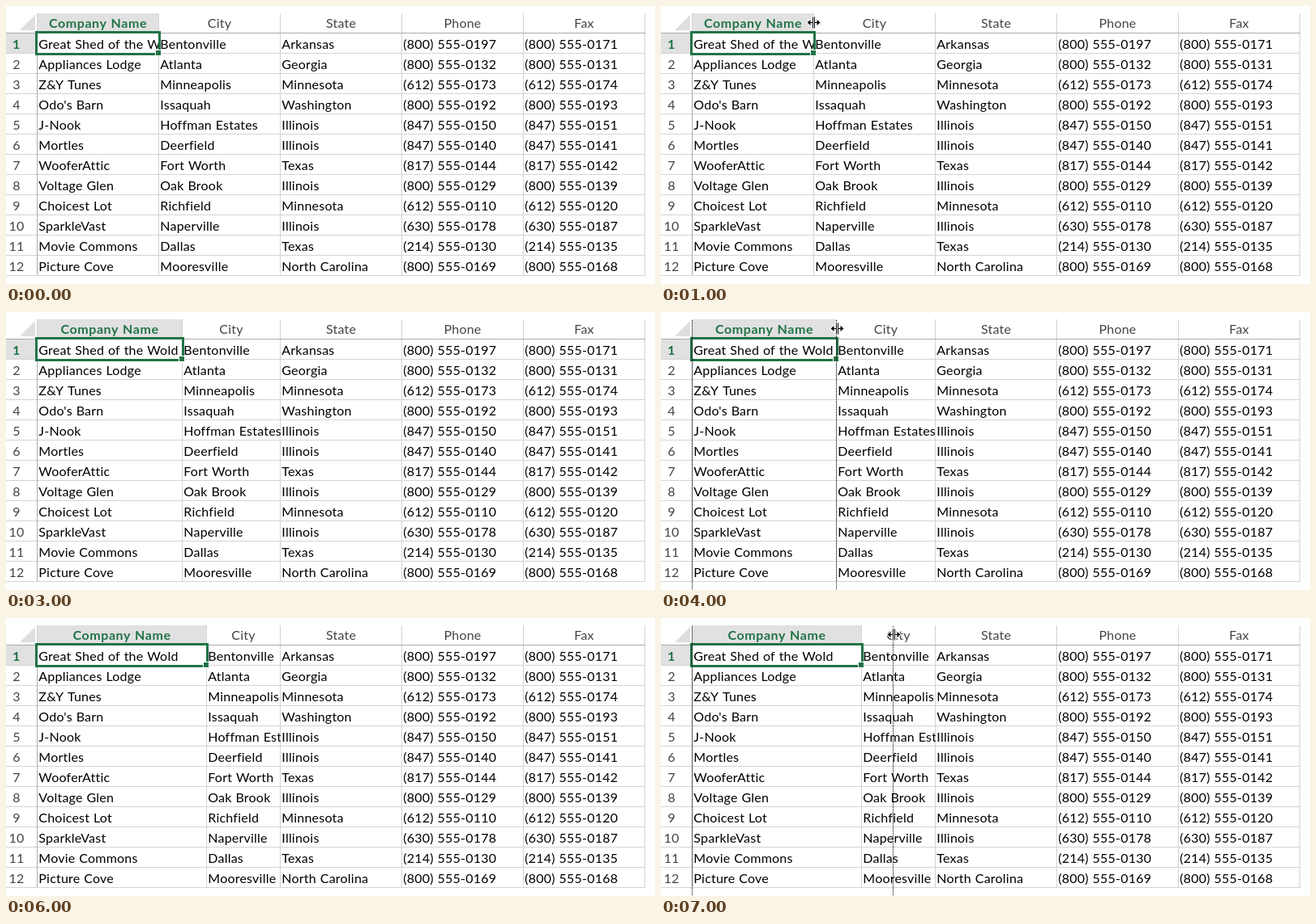
These frames come from a looping animation (801 by 344 pixels, 8000 ms). An HTML page with a canvas:

```html
<!DOCTYPE html>
<html lang="en">
<head>
<meta charset="utf-8">
<title>Resizing a spreadsheet column</title>
<style>
  html, body { margin: 0; width: 100%; height: 100%; overflow: hidden; background: #fff; }
  canvas { display: block; }
</style>
</head>
<body>
<canvas width="801" height="344"></canvas>
<script>
const ctx = document.querySelector('canvas').getContext('2d');
const GREEN = '#217346', GRID = '#d4d4d4', EDGE = '#ababab', SHADE = '#e1e1e1';
const LEFT = 38, TOP = 33, ROW = 25, RIGHT = 788, BOTTOM = 333;

const headers = ['Company Name', 'City', 'State', 'Phone', 'Fax'];
const rows = `Great Shed of the Wold|Bentonville|Arkansas|800|97|71
Appliances Lodge|Atlanta|Georgia|800|32|31
Z&Y Tunes|Minneapolis|Minnesota|612|73|74
Odo's Barn|Issaquah|Washington|800|92|93
J-Nook|Hoffman Estates|Illinois|847|50|51
Mortles|Deerfield|Illinois|847|40|41
WooferAttic|Fort Worth|Texas|817|44|42
Voltage Glen|Oak Brook|Illinois|800|29|39
Choicest Lot|Richfield|Minnesota|612|10|20
SparkleVast|Naperville|Illinois|630|78|87
Movie Commons|Dallas|Texas|214|30|35
Picture Cove|Mooresville|North Carolina|800|69|68`.split('\n').map(line => {
  const [name, city, state, area, phone, fax] = line.split('|');
  return [name, city, state, ...[phone, fax].map(n => `(${area}) 555-01${n}`)];
});

// One step per second: column border, pointer position, drag guide
const steps = [
  { border: 188 },
  { border: 188, pointer: 189 },
  { border: 188, pointer: 219, guide: 217 },
  { border: 217 },
  { border: 216, pointer: 218, guide: 216 },
  { border: 216, pointer: 249, guide: 247 },
  { border: 247 },
  { border: 247, pointer: 288, guide: 286 }
];

function fill(color, x, y, w, h) {
  ctx.fillStyle = color;
  ctx.fillRect(x, y, w, h);
}

function text(str, x, y, color, align = 'left', bold = false) {
  ctx.font = `${bold ? 700 : 400} 16px Lato, sans-serif`;
  ctx.letterSpacing = bold ? '0.6px' : '0.22px';
  ctx.wordSpacing = '0.5px';
  ctx.textAlign = align;
  ctx.fillStyle = color;
  ctx.fillText(str, x, y);
}

function label(str, x, y, active) {
  text(str, x, y, active ? GREEN : '#444', 'center', active);
}

function drawSheet(border) {
  const lines = [LEFT, border, 338, 488, 638, RIGHT];
  fill(SHADE, LEFT, 9, border - LEFT, TOP - 9);
  fill(SHADE, 0, TOP, LEFT, ROW);
  ctx.fillStyle = '#dedede';
  ctx.fill(new Path2D('M36 11V30H17Z'));

  for (let y = TOP; y <= BOTTOM; y += ROW) fill(GRID, 0, y, RIGHT + 1, 1);
  for (const x of lines) fill(GRID, x, 9, 1, BOTTOM - 8);
  fill(EDGE, 0, TOP, RIGHT + 1, 1);
  fill(EDGE, LEFT, TOP, 1, BOTTOM - TOP);

  headers.forEach((title, c) => {
    const [start, end] = [lines[c], lines[c + 1]];
    label(title, (start + end) / 2 + 0.5, 27, c === 0);
    ctx.save();
    ctx.beginPath();
    ctx.rect(start, TOP, end - start + 1, BOTTOM - TOP);
    ctx.clip();
    rows.forEach((row, r) => text(row[c], start + 2.3, TOP + 20 + r * ROW, '#000'));
    ctx.restore();
  });
  rows.forEach((_, r) => label(r + 1, 13, TOP + 20 + r * ROW, r === 0));
}

function drawSelection(border) {
  ctx.strokeStyle = GREEN;
  ctx.lineWidth = 3;
  ctx.strokeRect(LEFT - 0.5, TOP - 0.5, border + 2 - LEFT, ROW + 2);
  fill('#fff', border - 4, TOP + 21, 8, 8);
  fill(GREEN, border - 3, TOP + 22, 6, 6);
}

function drawGuide(x) {
  for (let y = 10; y < 343; y += 2) fill('#000', x, y, 1, 1);
}

// Two thin bars with an arrow on each side
function drawPointer(x) {
  const half = 'M.5-7H1.5V-.5H4V-3.5L8 0 4 3.5V.5H1.5V7H.5Z';
  const shape = new Path2D(half);
  shape.addPath(new Path2D(half), new DOMMatrix([-1, 0, 0, 1, 0, 0]));
  ctx.save();
  ctx.translate(x - 0.5, 20.5);
  ctx.strokeStyle = '#fff';
  ctx.lineWidth = 2;
  ctx.stroke(shape);
  ctx.fillStyle = '#000';
  ctx.fill(shape);
  ctx.restore();
}

function draw(now) {
  const { border, pointer, guide } = steps[Math.floor(now / 1000) % steps.length];
  fill('#fff', 0, 0, 801, 344);
  drawSheet(border);
  drawSelection(border);
  if (guide) [LEFT, guide].forEach(drawGuide);
  if (pointer) drawPointer(pointer);
  requestAnimationFrame(draw);
}
draw(performance.now());
</script>
</body>
</html>
```
